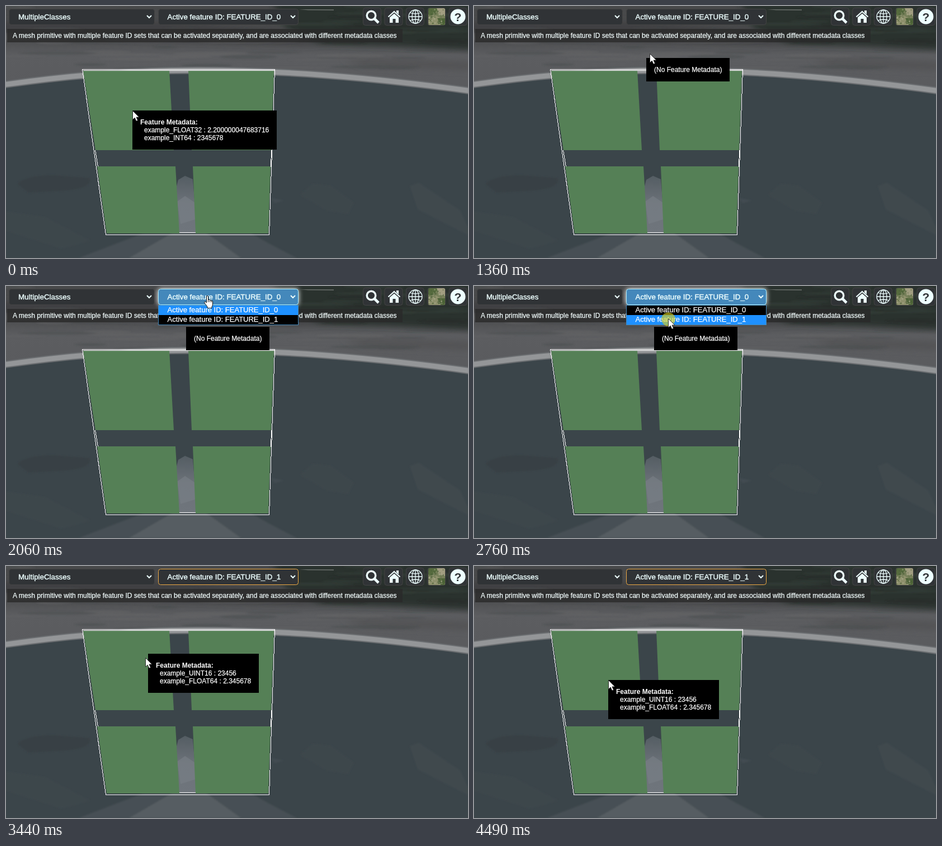
Animation of 826x451 px, one loop 5.17 s. Source, as an HTML page:

```html
<!DOCTYPE html>
<html lang="en">
<head>
<meta charset="utf-8">
<title>Feature metadata viewer</title>
<style>
  html, body { margin: 0; width: 100%; height: 100%; overflow: hidden; background: #3b454a; }
  svg { display: block; width: 826px; height: 451px; }
  text { font: 12px "Liberation Sans", Arial, sans-serif; fill: #fff; stroke: #fff; stroke-width: .25; white-space: pre; }
  .ui { font-size: 13.333px; fill: #edffff; stroke: #edffff; stroke-width: .4; }
  .item { font-size: 13px; }
  .btn { fill: #303336; stroke: #444; }
  .bold { font-weight: bold; stroke: none; }
  .glow { filter: drop-shadow(0 0 4px #fff); }
  .chev { fill: none; stroke: #edffff; stroke-width: 2; }
  .wire { fill: none; stroke: #fff; shape-rendering: crispEdges; }
</style>
</head>
<body>
<svg viewBox="0 0 826 451">
  <defs>
    <filter id="soft" x="-20%" y="-50%" width="140%" height="200%"><feGaussianBlur stdDeviation="1.6"/></filter>
    <filter id="wide" x="-30%" y="-60%" width="160%" height="220%"><feGaussianBlur stdDeviation="6"/></filter>
    <linearGradient id="sky" x2="0" y2="1">
      <stop offset="0" stop-color="#48494a"/>
      <stop offset=".35" stop-color="#4a4b4d"/>
      <stop offset=".55" stop-color="#5c5d60"/>
      <stop offset="1" stop-color="#595a5d"/>
    </linearGradient>
    <linearGradient id="shine" x2="0" y2="1">
      <stop offset="0" stop-color="#545d63"/>
      <stop offset=".5" stop-color="#6c7279"/>
      <stop offset="1" stop-color="#6f757c"/>
    </linearGradient>
    <clipPath id="thumb"><rect x="755" y="4" width="30" height="30" rx="3"/></clipPath>
  </defs>

  <!-- terrain -->
  <rect width="826" height="160" fill="url(#sky)"/>
  <g filter="url(#wide)">
    <path d="M470 -20H850V80L690 72L560 68L500 40Z" fill="#2b332f"/>
    <path d="M-20 28H290L480 44L560 70L300 62L-20 50Z" fill="#3f4142"/>
    <path d="M600 92L850 100V116L640 108Z" fill="#525355"/>
  </g>
  <g id="streaks" filter="url(#soft)"></g>
  <path d="M524 6.2L586 6.6V7.6L540 7.2Z" fill="#8d918e"/>
  <path d="M-5 141C200 112 430 97 831 152V460H-5Z" fill="#3b454a"/>
  <path d="M-5 141C200 112 430 97 831 152" fill="none" stroke="#6a6d70" stroke-width="13"/>
  <path d="M-5 141C200 112 430 97 831 152" fill="none" stroke="#949698" stroke-width="9"/>
  <g filter="url(#soft)">
    <path d="M20 318Q35 303 85 303L150 308Q155 325 110 330L40 334Z" fill="#374045"/>
    <path d="M526 338L548 318L582 322L622 352L612 372L574 366Z" fill="#3e474c"/>
    <path d="M722 322L738 316L812 366L826 396V410L736 364Z" fill="#3f484d"/>
    <path d="M0 368L70 378L150 420L100 434L0 402Z" fill="#3e474c"/>
    <path d="M130 451L250 405L430 402L470 425L520 451Z" fill="#474f54"/>
    <path d="M220 451L300 405L356 405L420 451Z" fill="#565d62"/>
    <path d="M475 344L496 348L480 353Z" fill="#434c51"/>
  </g>
  <path d="M308 311L320 304L334 310L342 405H308L303 330Z" fill="url(#shine)"/>
  <path d="M306 350L320 340L338 352V382L312 390Z" fill="#7a8087" opacity=".6"/>

  <!-- model -->
  <path class="wire" d="M159.5 258L164.5 288M474.5 258L473.5 288M138 115.5H480M310 405.5H339"/>
  <g fill="#558056">
    <path d="M138 116H292L300 258H160Z"/>
    <path d="M326 116H479L474 258H332Z"/>
    <path d="M163 287H303L310 407H180Z"/>
    <path d="M334 287H473L469 407H339Z"/>
  </g>
  <path class="wire" d="M136.5 113.5H480.5L470.5 409.5H178.5Z"/>

  <!-- toolbar -->
  <rect x="2" y="41" width="707" height="24" fill="#2a2a2a" opacity=".8"/>
  <text x="12" y="57" style="fill:#edffff">A mesh primitive with multiple feature ID sets that can be activated separately, and are associated with different metadata classes</text>
  <rect class="btn" x="5.5" y="5.5" width="260" height="28" rx="4"/>
  <text class="ui" x="22" y="24">MultipleClasses</text>
  <path class="chev" d="M252 17L256 21L260 17"/>
  <rect id="box" class="btn" x="272.5" y="5.5" width="250" height="28" rx="4"/>
  <text id="choice" class="ui" x="288.5" y="24"></text>
  <path class="chev" d="M509 17L513 21L517 17"/>
  <g id="buttons"></g>
  <g fill="none" stroke="#edffff">
    <circle cx="653" cy="17" r="7.8" stroke-width="3.4"/>
    <path d="M658.5 22.5L666 30" stroke-width="4.6"/>
    <g stroke-width="1.3">
      <circle cx="732" cy="19" r="12"/>
      <ellipse cx="732" cy="19" rx="6" ry="12"/>
      <path d="M732 7V31M720 19H744M722.5 12Q732 16 741.5 12M722.5 26Q732 22 741.5 26"/>
    </g>
    <path d="M683.5 19.5L694 10L704.5 19.5" stroke-width="2.2"/>
  </g>
  <path d="M698 8H702V15L698 11.5ZM694 13.5L702 20.5V30H696.5V23H691.5V30H686V20.5Z" fill="#edffff"/>
  <g clip-path="url(#thumb)">
    <rect x="755" y="4" width="30" height="30" fill="#77805a"/>
    <path d="M755 4H774L764 15L755 18Z" fill="#566b3e"/>
    <path d="M770 4H785V18L774 15Z" fill="#a19d80"/>
    <path d="M755 24L769 17L785 27V34H755Z" fill="#8e906c"/>
    <path d="M771 22H785V34H778Z" fill="#4e6538"/>
    <g id="leaves"></g>
  </g>
  <circle cx="808" cy="19" r="13.5" fill="#edffff"/>
  <text class="bold" x="808" y="26.5" text-anchor="middle" style="font-size:21px;fill:#303336">?</text>

  <!-- overlays -->
  <g id="tip">
    <rect id="tipBox"/>
    <text id="head" x="14" y="25"></text>
    <text id="row0" x="21" y="39"></text>
    <text id="row1" x="21" y="53"></text>
  </g>
  <g id="list">
    <rect x="272.5" y="34.5" width="250" height="35" stroke="#48b"/>
    <rect id="mark" x="273" width="249" height="17" fill="#1e90ff"/>
    <text class="item" x="288.5" y="47">Active feature ID: FEATURE_ID_0</text>
    <text class="item" x="288.5" y="64">Active feature ID: FEATURE_ID_1</text>
  </g>
  <circle id="click" cx="347.5" cy="59.5" r="12.3" fill="#dcd21c" opacity=".62"/>
  <path id="arrow" d="M.5 .5V16.5L4.2 13L6.8 19L9.6 17.8L7 12H12Z" fill="#fff" stroke="#222" stroke-width=".9"/>
  <g id="hand" fill="#fff" stroke="#111" stroke-width="1" stroke-linejoin="round">
    <path d="M4.5 2Q4.5 .5 6 .5Q7.5 .5 7.5 2V8Q9.6 6.6 10.6 8.4Q12.4 7.6 13.4 9.2Q15.5 8.8 15.5 11V16Q15.5 18 14 20V22.5H6V20L1 13.5Q0 11.5 1.5 11Q3 10.7 4.5 13Z"/>
    <path d="M7.5 8V12M10.6 8.5V12M13.4 9.4V12" fill="none"/>
  </g>
</svg>
<script>
const $ = id => document.getElementById(id);
const LOOP = 5170;
const FIRST = ["example_FLOAT32 : 2.200000047683716", "example_INT64 : 2345678"];
const SECOND = ["example_UINT16 : 23456", "example_FLOAT64 : 2.345678"];

// at: start time, tip: tooltip corner, cur: cursor tip, rows: tooltip lines, mark: highlighted item
const STEPS = [
  { at: 0, tip: [226, 187], cur: [226, 187], rows: FIRST },
  { at: 1030, tip: [232, 182], cur: [237, 180], rows: FIRST },
  { at: 1360, tip: [308, 93], cur: [314, 85] },
  { at: 1710, tip: [322, 73], cur: [354, 17], hover: true, hand: true },
  { at: 2060, tip: [322, 73], cur: [354, 17], hover: true, hand: true, mark: 0 },
  { at: 2410, tip: [322, 73], cur: [347, 58], hover: true, mark: 1 },
  { at: 2760, tip: [322, 73], cur: [347, 58], hover: true, mark: 1, click: true },
  { at: 3110, tip: [322, 73], cur: [347, 52], id: 1 },
  { at: 3440, tip: [254, 157], cur: [249, 164], rows: SECOND, id: 1 },
  { at: 3790, tip: [238, 207], cur: [238, 207], rows: SECOND, id: 1 },
  { at: 4490, tip: [240, 204], cur: [240, 204], rows: SECOND, id: 1 }
];

function add(parent, tag, attrs) {
  const el = document.createElementNS("http://www.w3.org/2000/svg", tag);
  for (const k in attrs) el.setAttribute(k, attrs[k]);
  $(parent).appendChild(el);
}

function set(id, attrs) {
  for (const k in attrs) $(id).setAttribute(k, attrs[k]);
}

const show = (id, on) => { $(id).style.display = on ? "" : "none"; };
const move = (id, [x, y]) => set(id, { transform: `translate(${x} ${y})` });

function buildScene() {
  let seed = 11;
  const rnd = () => (seed = seed * 16807 % 2147483647) / 2147483647;
  for (let i = 0; i < 70; i++) {
    const x = rnd() * 826, y = rnd() * 115;
    const dark = x > 500 && y < 78;
    const fill = rnd() < .5 ? (dark ? "#3a443c" : "#66676a") : (dark ? "#222a26" : "#47494b");
    add("streaks", "ellipse", { cx: x, cy: y, rx: 20 + rnd() * 60, ry: 1 + rnd() * 3, fill, opacity: .4 });
  }
  for (let i = 0; i < 60; i++) {
    const fill = rnd() < .5 ? "#475c34" : "#a9a88a";
    add("leaves", "circle", { cx: 755 + rnd() * 30, cy: 4 + rnd() * 30, r: .6 + rnd() * 1.2, fill, opacity: .6 });
  }
  for (let i = 0; i < 5; i++) {
    add("buttons", "rect", { class: "btn", x: 638.5 + i * 38.4, y: 3.5, width: 32, height: 31, rx: 4 });
  }
}

function draw(t) {
  const s = STEPS.findLast(step => step.at <= t);
  const rows = s.rows || [];
  move("tip", s.tip);
  set("tipBox", {
    width: rows === FIRST ? 258 : rows === SECOND ? 198 : 149,
    height: s.rows ? 70 : 42
  });
  $("head").textContent = s.rows ? "Feature Metadata:" : "(No Feature Metadata)";
  set("head", { class: s.rows ? "bold" : "" });
  $("row0").textContent = rows[0] || "";
  $("row1").textContent = rows[1] || "";

  $("choice").textContent = "Active feature ID: FEATURE_ID_" + (s.id || 0);
  set("box", { class: s.hover ? "btn glow" : "btn" });
  $("box").style.fill = s.hover ? "#4488bb" : "";
  $("box").style.stroke = s.hover ? "#aaeeff" : s.id ? "#eeaa44" : "";

  show("list", s.mark !== undefined);
  set("mark", { y: s.mark ? 52 : 35 });
  show("click", s.click);
  show("hand", s.hand);
  show("arrow", !s.hand);
  move(s.hand ? "hand" : "arrow", s.cur);
}

function tick() {
  draw(performance.now() % LOOP);
  requestAnimationFrame(tick);
}

buildScene();
tick();
</script>
</body>
</html>
```
